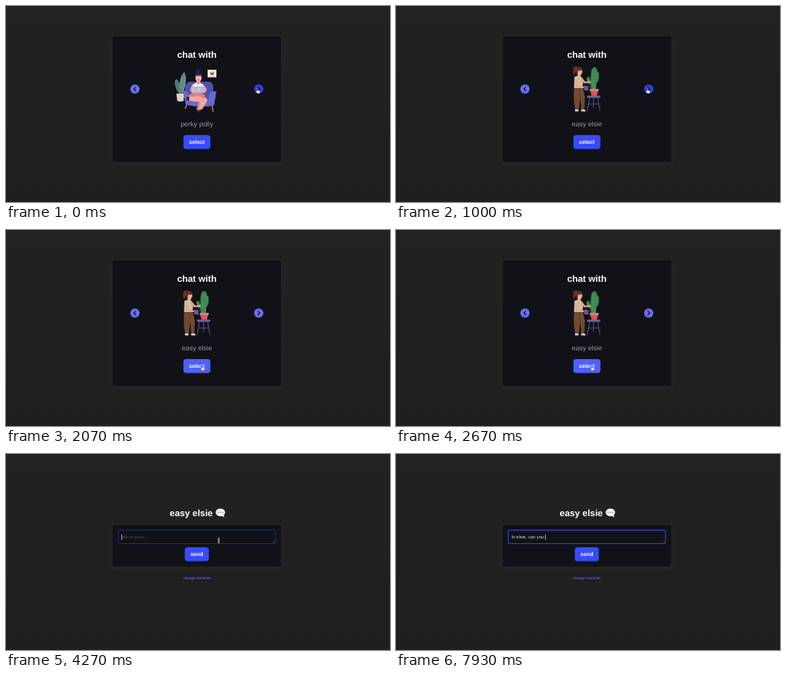
Recreate the animation shown at these times as an HTML page. Size 480 px wide and 246 px high, loop 8000 ms.

```html
<!DOCTYPE html>
<html lang="en">
<head>
<meta charset="utf-8">
<title>Character chat</title>
<style>
  html, body { margin: 0; width: 100%; height: 100%; overflow: hidden; background: #202020; }
  svg { display: block; width: 100vw; height: 100vh; }
  text {
    font-family: "Liberation Sans", Arial, sans-serif;
    text-rendering: geometricPrecision;
    text-anchor: middle;
    white-space: pre;
  }
  .title { font-size: 11.4px; font-weight: 700; fill: #fff; }
  .name { font-size: 8.5px; fill: #999aa0; }
  .label { font-size: 6.9px; font-weight: 700; fill: #fff; }
  .link { font-size: 4.17px; font-weight: 700; fill: #5d60ee; }
  .input { font-size: 5.66px; text-anchor: start; fill: #d6d6da; }
  .hint { fill: #4b4b53; }
  .card { fill: #111217; filter: drop-shadow(0 2px 3px #34343c90); }
  .button { fill: #3a4bff; }
  .round { fill: #6870f5; }

  #picker, #chat, #first, #second, #hover, #press, #focus, #cursor, .pointer {
    animation: 8s linear infinite;
  }
  #picker { animation-name: picker; animation-timing-function: step-end; }
  #chat { animation-name: chat; animation-timing-function: step-end; }
  #first { animation-name: first; }
  #second { animation-name: second; }
  #hover { animation-name: hover; }
  #press { animation-name: press; }
  #focus { animation-name: focus; }
  #cursor { animation-name: move; }
  .pointer { animation-timing-function: step-end; }
  #hand { animation-name: hand; }
  #arrow { animation-name: arrow; }
  #beam { animation-name: beam; }
  .sway { animation: sway 2s ease-in-out infinite; }

  @keyframes picker { 0% { opacity: 1 } 38.3%, 100% { opacity: 0 } }
  @keyframes chat { 0% { opacity: 0 } 38.3%, 100% { opacity: 1 } }
  @keyframes first { 0%, .8% { opacity: 1 } 5.5%, 100% { opacity: 0 } }
  @keyframes second { 0%, 5.5% { opacity: 0 } 11%, 100% { opacity: 1 } }
  @keyframes hover { 0%, 14.5% { fill: #303ee8 } 18%, 100% { fill: #6870f5 } }
  @keyframes press {
    0%, 21% { fill: #3a4bff }
    24%, 34% { fill: #515fff }
    35.2% { fill: #3a4bff }
    36.6%, 100% { fill: #515fff }
  }
  @keyframes focus {
    0%, 53% { stroke: #24252e; stroke-width: .7px }
    53.4% { stroke: #272c86; stroke-width: .9px }
    55.9%, 100% { stroke: #323edb; stroke-width: 1.1px }
  }
  @keyframes move {
    0%, 13.3% { transform: translate(314px, 103px); animation-timing-function: ease-in-out }
    20% { transform: translate(251.3px, 169.5px); animation-timing-function: ease-out }
    27%, 37% { transform: translate(244.5px, 169.7px); animation-timing-function: ease-in-out }
    40% { transform: translate(249px, 178px); animation-timing-function: ease-in-out }
    48.4% { transform: translate(268px, 121px); animation-timing-function: ease-out }
    51.6%, 100% { transform: translate(266px, 108.5px) }
  }
  @keyframes hand { 0% { opacity: 1 } 14.6% { opacity: 0 } 23% { opacity: 1 } 38.3%, 100% { opacity: 0 } }
  @keyframes arrow { 0% { opacity: 0 } 14.6% { opacity: 1 } 23% { opacity: 0 } 38.3% { opacity: 1 } 49.4%, 100% { opacity: 0 } }
  @keyframes beam { 0% { opacity: 0 } 49.4% { opacity: 1 } 68.3%, 100% { opacity: 0 } }
  @keyframes sway { 0%, 100% { transform: rotate(0) } 50% { transform: rotate(1.2deg) } }
</style>
</head>
<body>
<svg viewBox="0 0 480 246" preserveAspectRatio="none">
  <defs>
    <linearGradient id="shade" x2="0" y2="1">
      <stop stop-color="#222"/><stop offset="1" stop-color="#1f1f1f"/>
    </linearGradient>
  </defs>
  <rect width="480" height="246" fill="url(#shade)"/>

  <g id="picker">
    <rect class="card" x="133.3" y="38" width="210.7" height="158" rx="3"/>
    <text class="title" x="238.6" y="65">chat with</text>

    <circle class="round" cx="161.2" cy="104.2" r="5.8"/>
    <circle class="round" id="hover" cx="315.9" cy="104.2" r="5.8"/>
    <g fill="none" stroke="#14152c" stroke-width="1.3" stroke-linecap="round" stroke-linejoin="round">
      <path d="M162.2 101.9l-2.3 2.3 2.3 2.3M314.9 101.9l2.3 2.3-2.3 2.3"/>
    </g>

    <g id="first">
      <!-- plant and picture -->
      <g class="sway" style="transform-origin: 218px 112px">
        <path fill="#557b76" d="M218 112C211 105 209 93 213 92C218 95 219 103 219 112Z"/>
        <path fill="#6c918a" d="M218 112C215 101 218 86 223 83C227 91 224 104 220 112Z"/>
        <path d="M213 94l6 17M222 86l-3 25" stroke="#3d5d5d" stroke-width=".5"/>
      </g>
      <path fill="#ddd2c5" d="M213 110h10l-1 9q-4 2-8 0Z"/>
      <rect x="252" y="80" width="11" height="9.5" fill="#eee8e0"/>
      <path fill="#c64550" d="M257.5 87.5l-2.7-3q1-2.2 2.7-.5q2-1.7 2.8.5Z"/>
      <path stroke="#5b8a68" stroke-width=".6" d="M257.5 85l2-3"/>
      <!-- armchair -->
      <path stroke="#b87952" stroke-width="1.4" d="M226 123l-2 6M257 123l2 10"/>
      <path fill="#4b52ab" d="M224 101q1-6 7-6h22q6 0 6 7v18h-35Z"/>
      <path fill="#656bc9" d="M221 107q4-2 7 2l2 9h23l2-9q3-4 8-1l-3 17q-17 3-35-1Z"/>
      <path fill="#5057b4" d="M229 114h24v5h-25Z"/>
      <!-- reader -->
      <path fill="#e7797f" d="M231 110q10-4 17 1l2 8-8 13-4-2 3-10-12-1q-5-4 2-9Z"/>
      <path fill="#f3a49e" d="M226 114l16-1 6 4-4 4-14-2ZM243 120l6-6 3 4-7 12-4-1Z"/>
      <g fill="#fff2ec">
        <circle cx="233" cy="116" r=".6"/><circle cx="238" cy="117" r=".6"/>
        <circle cx="244" cy="117" r=".6"/><circle cx="248" cy="118" r=".6"/>
        <circle cx="246" cy="122" r=".6"/><circle cx="243" cy="126" r=".6"/>
      </g>
      <path fill="#242558" d="M238 130l4 1 0 3.2-4-1.2ZM226 114l3 0 0 5-4-1Z"/>
      <path fill="#f2eeee" d="M233 99q7-6 14 0l2 10h-17Z"/>
      <path fill="#ef9f91" d="M238 90h5v7l-2.5 2-2.5-2Z"/>
      <ellipse cx="240.6" cy="90" rx="4" ry="4.8" fill="#f5b2a1"/>
      <path fill="#20245e" d="M235.8 91q-1-8 4.5-8q6 0 5 8l-1.5-3.5h-6Z"/>
      <path fill="#20245e" d="M238.5 84l-.5-5.5 2.4 2 2.8-2.2-.4 5.7Z"/>
      <path d="M239 92.5q1.5 1.2 3 0" stroke="#b94d54" stroke-width=".6" fill="none"/>
      <path fill="#b4b9d9" d="M232.5 101h15.5l1.5 8h-15Z"/>
      <circle cx="241" cy="105" r=".9" fill="#f3f3fa"/>
      <path stroke="#f1a497" stroke-width="2" fill="none" stroke-linecap="round" d="M233 100l-2 6 4 3M247 100l3 5-2 3"/>
    </g>
    <text class="name" x="238.6" y="151.2" id="name"></text>

    <g id="second">
      <!-- stool, pot and cactus -->
      <g stroke="#584a8e" stroke-width="1.1" fill="none">
        <path d="M242 115l-3 16.5M252 115l3 16.5M247 115v13M241 123h12"/>
      </g>
      <rect x="238.5" y="112.6" width="17" height="2.6" rx="1.2" fill="#70609f"/>
      <g class="sway" style="transform-origin: 247px 105px">
        <path fill="#39854f" d="M243.5 105q-2-25 2.5-28q6-2 5 9l-1 19Z"/>
        <g fill="none" stroke="#39854f" stroke-linecap="round">
          <path stroke-width="4" d="M240 91q0 6 5 6"/>
          <path stroke-width="3.5" d="M251.5 84v6q0 5-4 6"/>
        </g>
        <path stroke="#73aa73" stroke-width=".5" fill="none" d="M246 80q-1 12 0 24M249 80q0 12-1 24M239.5 91q1 5 4 6M251.5 84v6"/>
      </g>
      <path fill="#ee737a" d="M242 104h11.5l-.5 3h-10.5Z"/>
      <path fill="#d95563" d="M243 107h9.5l-1.5 5.8h-6.5Z"/>
      <!-- gardener -->
      <path fill="#734a34" d="M223 101h10l3 13-.5 16h-4l-1-15-2 15h-4.5q-3-16-1-29Z"/>
      <path stroke="#52321f" stroke-width=".6" fill="none" d="M229.5 104l.5 11"/>
      <path fill="#f0e5df" d="M223.5 130h4.5v2.3h-4ZM231.5 130h4l2 2.3h-6Z"/>
      <path fill="#cbbda0" d="M223 89q5-3 9 0l2 6-1 8h-10.5Z"/>
      <path fill="#eaa68e" d="M227 84h4v5h-4Z"/>
      <ellipse cx="229.5" cy="82.6" rx="3.3" ry="4" fill="#f1b197"/>
      <path fill="#64321f" d="M233.5 80q-2-4-6-3.5q-6-2.2-6 3.5q-1 5 1.6 7l1.4-4 2.5 2 1-4q3 1 5.5-1Z"/>
      <path d="M230.5 85q1 .5 1.7-.2" stroke="#a54843" stroke-width=".5" fill="none"/>
      <g class="sway" style="transform-origin: 231px 91px">
        <path stroke="#eaa68e" stroke-width="2.1" fill="none" stroke-linecap="round" stroke-linejoin="round" d="M232 91l4 5 6.5-1M224 91l1.5 9 9 2"/>
        <path fill="#6c55a0" d="M235 100h5l1 6h-5.5Z"/>
        <path stroke="#6c55a0" stroke-width=".9" d="M240 103l3-3"/>
      </g>
    </g>

    <rect class="button" id="press" x="221.8" y="161.9" width="33.7" height="17.7" rx="3.5"/>
    <text class="label" x="238.6" y="173.3">select</text>
  </g>

  <g id="chat">
    <text class="title" x="231.5" y="78">easy elsie</text>
    <ellipse cx="268" cy="73.3" rx="5.8" ry="4.9" fill="#f5f5f7"/>
    <path fill="#f5f5f7" d="M268.5 77l4.2 2.4-.6-4Z"/>
    <g fill="#77787f">
      <circle cx="265.1" cy="73.3" r=".8"/><circle cx="268" cy="73.3" r=".8"/><circle cx="270.9" cy="73.3" r=".8"/>
    </g>
    <rect class="card" x="133.3" y="89" width="210.7" height="52.4" rx="3"/>
    <rect id="focus" x="140.2" y="95.6" width="196.8" height="16.9" rx="2" fill="#111217"/>
    <path d="M333.5 111.3l2.4-2.4M335 111.3l.9-.9" stroke="#777" stroke-width=".4"/>
    <text class="input" id="typed" x="144.4" y="106.2"></text>
    <rect id="caret" y="101.1" width=".7" height="6.6" fill="#eee"/>
    <rect class="button" x="223.5" y="117" width="30" height="17.5" rx="3.5"/>
    <text class="label" x="238.5" y="128.4">send</text>
    <text class="link" x="238.7" y="156.8">change character</text>
  </g>

  <g id="cursor">
    <path class="pointer" id="hand" fill="#fff" stroke="#111" stroke-width=".5" stroke-linejoin="round"
      d="M-.6 .6q.6-1 1.2 0v2.2l2.4.5q.9.4.7 1.4l-.6 2.1h-3.1l-2-2.6q.3-1 1.4 0Z"/>
    <path class="pointer" id="arrow" fill="#0b0b0b" stroke="#fff" stroke-width=".5" stroke-linejoin="round"
      d="M0 0v5l1.2-1 .9 1.9.9-.4-.8-1.8h1.5Z"/>
    <path class="pointer" id="beam" fill="none" stroke="#ddd" stroke-width=".7"
      d="M-1.3-3q1.3 0 1.3.8v4.4q0 .8-1.3.8M1.3-3q-1.3 0-1.3.8v4.4q0 .8 1.3.8"/>
  </g>
</svg>
<script>
  const LOOP = 8000, SWAP = 440, FOCUS = 4270, BLINK = 530, LEFT = 144.4;
  const message = "hi elsie, can you ";
  const keyTimes = [5470, 5600, 5730, 5870, 6000, 6200, 6330, 6400, 6600,
                    6800, 6930, 7070, 7200, 7270, 7470, 7670, 7870, 7930];
  const [name, typed, caret] = ["name", "typed", "caret"].map(id => document.getElementById(id));
  const start = performance.now();

  function setText(node, value) {
    if (node.textContent !== value) node.textContent = value;
  }

  function draw() {
    const t = (performance.now() - start) % LOOP;
    const count = keyTimes.filter(time => t >= time).length;

    setText(name, t < SWAP ? "perky polly" : "easy elsie");
    name.style.opacity = Math.min(1, t < SWAP ? 1 - (t - 70) / 370 : (t - SWAP) / 440);

    setText(typed, count ? message.slice(0, count) : "talk to elsie...");
    typed.classList.toggle("hint", !count);

    const lit = Math.floor((t - FOCUS) / BLINK) % 2 === 0;
    caret.style.opacity = t >= FOCUS && (count || lit) ? 1 : 0;
    caret.setAttribute("x", LEFT + (count ? typed.getComputedTextLength() : 0));
    requestAnimationFrame(draw);
  }
  draw();
</script>
</body>
</html>
```
